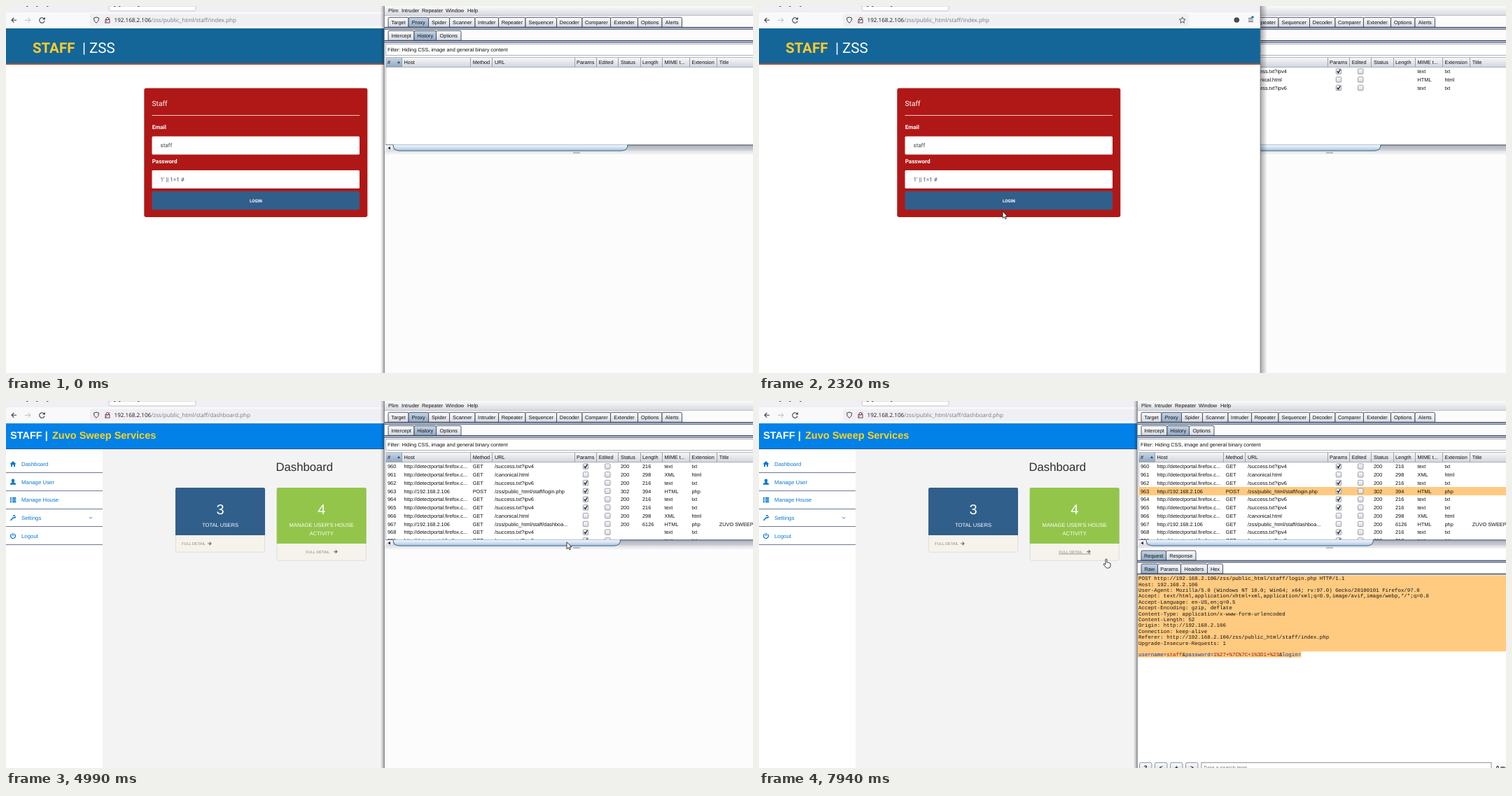
Animation, 1067 px wide and 525 px high, one loop 8 s. Source, as an HTML page:

```html
<!DOCTYPE html>
<html lang="en">
<head>
<meta charset="utf-8">
<title>Login replay</title>
<style>
html, body { margin: 0; width: 100%; height: 100%; overflow: hidden; background: #fff; }
svg { display: block; width: 1067px; height: 525px; }
text { font-family: "Liberation Sans", Arial, sans-serif; text-rendering: geometricPrecision; white-space: pre; }
.r { font-family: Roboto, sans-serif; }
.u { font-family: "Open Sans", sans-serif; }
.m { font-family: "Liberation Mono", monospace; }
.b { font-weight: 700; }
.c { text-anchor: middle; }
</style>
</head>
<body>
<svg id="stage" viewBox="0 0 1067 525"></svg>
<script>
const LOOP = 8000, END = 9999;

// Moments at which the picture switches
const at = {
  browserFront: 940, dropdown: 1010, selected: 1080, badge: 1280, blur: 1700,
  hover: 2390, submit: 2590, dashboard: 3670, loaded: 4500, proxyFront: 4570,
  pickRow: 5600, drag: 6980, dragEnd: 7740, link: 7870
};

// time, x, y, shape
const track = [
  [260, 950, 515, 'arrow'], [330, 640, 360, 'arrow'], [400, 313, 201, 'beam'],
  [600, 313, 201, 'beam'], [740, 299, 245, 'beam'], [940, 299, 245, 'beam'],
  [1150, 64, 238, 'arrow'], [1280, 120, 222, 'arrow'], [1420, 121, 223, 'arrow'],
  [1560, 362, 270, 'arrow'], [1750, 362, 276, 'arrow'], [2190, 354, 323, 'arrow'],
  [2250, 352, 323, 'arrow'], [2320, 348, 294, 'arrow'], [2390, 346, 277, 'hand'],
  [2590, 346, 277, 'arrow'], [2930, 605, 325, 'arrow'], [3950, 605, 325, 'arrow'],
  [4290, 770, 321, 'arrow'], [4500, 770, 321, 'arrow'], [4990, 801, 202, 'arrow'],
  [5260, 790, 150, 'arrow'], [5600, 778, 125, 'arrow'], [6170, 778, 125, 'arrow'],
  [6370, 912, 270, 'beam'], [6580, 808, 366, 'beam'], [6980, 808, 366, 'beam'],
  [7500, 526, 246, 'arrow'], [7800, 526, 246, 'arrow'], [7870, 492, 226, 'hand']
];

const rect = (x, y, w, h, fill, more = '') =>
  `<rect x="${x}" y="${y}" width="${w}" height="${h}" fill="${fill}" ${more}/>`;
const text = (x, y, s, size, fill, cls = '') =>
  `<text x="${x}" y="${y}" font-size="${size}" fill="${fill}" class="${cls}">${s}</text>`;
const line = (d, color, w = 1, more = '') =>
  `<path d="${d}" fill="none" stroke="${color}" stroke-width="${w}" ${more}/>`;
const shape = (d, fill, more = '') => `<path d="${d}" fill="${fill}" ${more}/>`;
const span = (from, to, s) => `<g data-from="${from}" data-to="${to}">${s}</g>`;
const grad = (id, a, b, dir = 'x2="0" y2="1"') =>
  `<linearGradient id="${id}" ${dir}><stop stop-color="${a}"/><stop offset="1" stop-color="${b}"/></linearGradient>`;
const shade = (id, a, b) =>
  `<linearGradient id="${id}"><stop stop-color="#000" stop-opacity="${a}"/><stop offset="1" stop-color="#000" stop-opacity="${b}"/></linearGradient>`;

/* ---------- browser ---------- */

function urlBar(file, from, to) {
  return span(from, to, `<text x="154.5" y="23" font-size="8.1" class="u" fill="#15141a">192.168.2.106<tspan fill="#77767f">/zss/public_html/staff/${file}.php</tspan></text>`);
}

function chrome() {
  const ink = '#3c3b44';
  const scraps = [29, 43, 58, 154, 161, 188].map(x => rect(x, 0, 2.5, 1, '#55545c')).join('');
  return rect(0, 0, 716, 9, '#f0f0f4') +
    shape('M147 0V4.5Q147 7 149.5 7H268.5Q271 7 271 4.5V0Z', '#fff', 'stroke="#b9b9c0" stroke-width=".8"') +
    span(at.submit, at.loaded, shape('M146 0H174L170 6.5H149Q147 6.5 146 3Z', '#a9d5fb')) + scraps +
    rect(0, 9, 716, 23, '#f9f9fb') +
    rect(120, 11.5, 494, 17, '#f0f0f4', 'rx="2"') +
    line('M15 20.3H8M11.3 17L8 20.3L11.3 23.6', ink, 1.1) +
    line('M27 20.3H35M31.7 17L35 20.3L31.7 23.6', '#b9b9bf', 1) +
    span(0, at.submit, reload()) + span(at.loaded, END, reload()) +
    span(at.submit, at.loaded, line('M48.2 17.2L54.8 23.8M54.8 17.2L48.2 23.8', '#aaaab0', .9)) +
    line('M129 16L132.6 17.2Q132.8 22 129 24.4Q125.2 22 125.4 17.2Z', ink, 1) +
    rect(142, 19.5, 6, 4.5, 'none', `stroke="${ink}" stroke-width=".9"`) +
    line('M143 19V17.5Q145 14.8 147 17.5V19', ink, .9) + line('M141.3 24.3L148.3 16.5', '#e22850', .9) +
    urlBar('index', 0, at.dashboard) + urlBar('dashboard', at.dashboard, END) +
    line('M604.7 15.8L606 18.6L609 19L606.8 21.1L607.4 24.2L604.7 22.7L602 24.2L602.6 21.1L600.4 19L603.4 18.6Z', ink, .9) +
    '<circle cx="682.3" cy="20" r="3.8" fill="#4a4952"/>' +
    line('M699 17.5H705M699 20H706M699 22.5H706', ink, .9) +
    '<circle cx="705" cy="16" r="1.8" fill="#12808c"/>';
}

function reload() {
  return line('M54.6 18.6A3.7 3.7 0 1 0 55 21.4', '#3c3b44', 1.1) + shape('M55.8 16V19.6H52.2Z', '#3c3b44');
}

const field = y => rect(208.5, y, 296.5, 26, '#fff', 'rx="1.5"');

function loginPage() {
  const pass = "1' || 1=1 #";
  return rect(0, 32, 716, 493, '#fff') +
    rect(0, 32, 716, 50, '#146698') + rect(0, 82, 716, 2, '#a8513f') +
    text(38, 66.8, 'STAFF', 20.5, '#ffcb2d', 'r b') +
    text(109, 66.8, '| ZSS', 20.5, '#fff', 'r') +
    rect(197.3, 117.6, 319, 184.5, '#b01817', 'rx="3"') +
    text(208.5, 143.3, 'Staff', 10.2, '#fff', 'r') +
    rect(208.5, 156, 296.5, 1, '#ecc9c9') +
    text(208.7, 176.4, 'Email', 8.1, '#fff', 'r b') + field(186.4) +
    text(220.5, 202, 'staff', 8, '#444', 'r') +
    text(208.7, 225.2, 'Password', 8.1, '#fff', 'r b') + field(235) +
    text(220.5, 250.6, pass, 8, '#444', 'r') +
    rect(208.5, 265, 296.5, 26.4, '#305f8b', 'rx="2"') +
    span(at.hover, at.submit, rect(208.5, 265, 296.5, 26.4, '#294f75', 'rx="2"')) +
    text(357, 280.6, 'LOGIN', 6.2, '#fff', 'r b c') +
    span(at.browserFront, at.blur, rect(208.6, 235, 296.4, 26, 'none', 'rx="2" stroke="#1f74bd" stroke-width="1.4"')) +
    span(at.selected, at.blur, rect(220, 243, 34.3, 10.2, '#0078d7') + text(220.5, 250.6, pass, 8, '#fff', 'r')) +
    span(at.dropdown, at.blur, rect(208.5, 261.3, 296.5, 11.8, '#dadada', 'stroke="#aaa" stroke-width=".6"') +
      text(212, 270, pass, 7.6, '#222', 'u')) +
    span(at.badge, at.blur, rect(128, 210, 17, 17, '#ef5150', 'rx="2.5"') +
      '<circle cx="136" cy="217.7" r="3.9" fill="none" stroke="#fff"/>' + line('M138.8 220.6L141.3 223', '#fff', 1.1));
}

function dashboardPage() {
  const blue = '#0b79d0';
  const icons = [
    shape('M5.5 .3L10 -4L14.5 .3H13V4H11V1.2H9V4H7V.3Z', blue),
    shape('M10 -4.2Q13 -4 12 -.7L11.3 .8L14 2.2V4H6V2.2L8.7 .8L8 -.7Q7 -4 10 -4.2Z', blue),
    line('M6 -2.8H8M9 -2.8H14.3M6 0H8M9 0H14.3M6 2.8H8M9 2.8H14.3', blue, 1.9),
    line('M6.5 3.5L11 -1M10.2 -2.6Q11 -4 13 -3.2M13.6 -2Q13 .3 11 -.4', blue, 1.7),
    line('M8 -2.6A3.4 3.4 0 1 0 12 -2.6M10 -4.2V0', blue, 1.3)
  ];
  const menu = ['Dashboard', 'Manage User', 'Manage House', 'Settings', 'Logout'].map((name, i) => {
    const y = 90 + 25.75 * i;
    return `<g transform="translate(0 ${y})">${icons[i]}</g>` + text(22, y + 2.8, name, 7.85, blue) +
      rect(0, Math.round(y + 12.2), 138, 1, '#6c7899');
  }).join('');
  const arrow = (x, y) => line(`M${x} ${y}H${x + 5}M${x + 2.6} ${y - 2.3}L${x + 5} ${y}L${x + 2.6} ${y + 2.3}`, '#77736a', 1.2);
  const card = (x, h, fill, num, words, more) => rect(x + .4, 126, 127.2, h + 22.2, '#f6f3ed', 'rx="2" stroke="#dcd8d0" stroke-width=".8"') +
    shape(`M${x} ${124 + h}V126Q${x} 124 ${x + 2} 124H${x + 126}Q${x + 128} 124 ${x + 128} 126V${124 + h}Z`, fill) +
    text(x + 64, 161.6, num, 20, '#fff', 'c') +
    words.map((w, i) => text(x + 64, 180 + 11.6 * i, w, 7.65, '#fff', 'c')).join('') + more;
  return rect(0, 32, 716, 493, '#f3f3f3') + rect(0, 69, 138, 456, '#fff') +
    rect(0, 32, 716, 36.5, '#0281e8') + rect(0, 68, 716, 1, '#27608f') +
    text(6, 53.8, 'STAFF |', 14.5, '#fff', 'b') + text(66, 53.8, 'Zuvo Sweep Services', 14.5, '#f9d423', 'b') +
    rect(615, 32, 101, 34, '#36a5c5') +
    '<circle cx="665.3" cy="49" r="2.3" fill="none" stroke="#fff" stroke-width="2"/>' +
    '<circle cx="665.3" cy="49" r="3.5" fill="none" stroke="#fff" stroke-width="1.2" stroke-dasharray="1.4 1.35"/>' +
    line('M699.6 58L702 60.3L704.4 58', '#fff', .9) +
    menu + line('M118.8 166L121 168.2L123.2 166', blue, .9) +
    text(385.5, 100, 'Dashboard', 16.7, '#2e2e2e') +
    card(242, 68, '#305f8b', 3, ['TOTAL USERS'], text(251, 206, 'FULL DETAIL', 5.6, '#8c877c') + arrow(288, 204)) +
    card(386.7, 80, '#93c54b', 4, ["MANAGE USER'S HOUSE", 'ACTIVITY'], text(428.2, 217.8, 'FULL DETAIL', 5.6, '#8c877c') +
      arrow(468, 215.6) + span(at.link, END, rect(428, 218.6, 46, .7, '#77736a')));
}

/* ---------- proxy tool ---------- */

const SMALL = 7.35, INK = '#111';

function tabs(y, list, active) {
  return list.map(([name, x, end]) =>
    shape(`M${x} ${y + 14}V${y + 2}Q${x} ${y} ${x + 2} ${y}H${end - 2}Q${end} ${y} ${end} ${y + 2}V${y + 14}Z`,
      `url(#${name === active ? 'tabOn' : 'tab'})`, 'stroke="#3a4358" stroke-width=".9"') +
    text((x + end) / 2, y + 9.5, name, SMALL, INK, 'c')).join('') +
    rect(540, y + 13.7, 527, 1.2, '#2e3a57') + rect(540, y + 14.9, 527, 1.4, '#b3c1d3') + rect(540, y + 16.3, 527, 1, '#2e3a57');
}

function check(x, y, on) {
  return rect(x - 3.7, y - 3.7, 7.4, 7.4, 'url(#tab)', 'rx="1" stroke="#858a94" stroke-width=".8"') +
    (on ? line(`M${x - 2.2} ${y - .3}L${x - .5} ${y + 2}L${x + 2.4} ${y - 2.8}`, '#1a2030', 1.3) : '');
}

const columns = [['#', 541, 545], ['Host', 565, 568.5], ['Method', 663, 666.7], ['URL', 694, 698], ['Params', 812, 815],
  ['Edited', 843, 846.7], ['Status', 874, 878], ['Length', 906, 909], ['MIME t...', 937, 940.5], ['Extension', 976, 979.5], ['Title', 1015, 1018.7]];

const kinds = {
  v4: ['GET', '/success.txt?ipv4', 1, 200, 216, 'text', 'txt'],
  v6: ['GET', '/success.txt?ipv6', 1, 200, 216, 'text', 'txt'],
  canon: ['GET', '/canonical.html', 0, 200, 298, 'XML', 'html'],
  login: ['POST', '/zss/public_html/staff/login.php', 1, 302, 394, 'HTML', 'php'],
  dash: ['GET', '/zss/public_html/staff/dashboa...', 0, 200, 6126, 'HTML', 'php', 'ZUVO SWEEP SERVICES']
};

// kind, time of request, time of answer
const log = [['v4', 1950, 2800], ['canon', 1950, 2800], ['v6', 1950, 3070], ['login', 2660, 2800], ['v6', 3070, 4000],
  ['v4', 3140, 4000], ['canon', 3670, 4070], ['dash', 3670, 3670], ['v4', 4140, 5200], ['v6', 4210, 5200]];

function row([kind, sent, done], i) {
  const [method, url, params, status, size, mime, ext, title = ''] = kinds[kind];
  const y = 93.5 + 11.77 * i;
  const host = kind === 'login' || kind === 'dash' ? 'http://192.168.2.106' : 'http://detectportal.firefox.c...';
  const cell = (col, s) => text(columns[col][2], y + 2.7, s, SMALL, INK);
  return span(sent, END, cell(0, 960 + i) + cell(1, host) + cell(2, method) + cell(3, url) +
    check(828, y, params) + check(859.3, y, 0) + cell(9, ext) + cell(10, title) +
    span(sent, done, cell(8, mime === 'XML' ? 'HTML' : mime)) +
    span(done, END, cell(6, status) + cell(7, size) + cell(8, mime)));
}

function thumb(end) {
  return shape(`M553 198.6Q553 207 562 207H${end - 9}Q${end} 207 ${end} 198.6`, 'url(#thumb)', 'stroke="#3d5f85"');
}

const request = ['POST http://192.168.2.106/zss/public_html/staff/login.php HTTP/1.1', 'Host: 192.168.2.106',
  'User-Agent: Mozilla/5.0 (Windows NT 10.0; Win64; x64; rv:97.0) Gecko/20100101 Firefox/97.0',
  'Accept: text/html,application/xhtml+xml,application/xml;q=0.9,image/avif,image/webp,*/*;q=0.8',
  'Accept-Language: en-US,en;q=0.5', 'Accept-Encoding: gzip, deflate', 'Content-Type: application/x-www-form-urlencoded',
  'Content-Length: 52', 'Origin: http://192.168.2.106', 'Connection: keep-alive',
  'Referer: http://192.168.2.106/zss/public_html/staff/index.php', 'Upgrade-Insecure-Requests: 1', '',
  [['username', 'staff'], ['password', '1%27+%7C%7C+1%3D1+%23'], ['login', '']].map(([k, v]) =>
    `<tspan fill="#1a2f9c">${k}=</tspan><tspan fill="#9a1515">${v}</tspan>`).join('&amp;')];
const PITCH = 8.385, lineTop = i => 249.3 + PITCH * i;

function requestPanel() {
  const buttons = ['?', '&lt;', '+', '&gt;'].map((s, i) =>
    rect(543.5 + 22 * i, 517.3, 17.5, 14, 'url(#tab)', 'rx="2.5" stroke="#8b93a0"') + text(552.3 + 22 * i, 527, s, 8, INK, 'c b')).join('');
  return rect(540, 211, 527, 314, '#fff') +
    tabs(214, [['Request', 546, 581.5], ['Response', 581.5, 624]], 'Request') +
    tabs(233, [['Raw', 546, 569.5], ['Params', 569.5, 602.5], ['Headers', 602.5, 640.5], ['Hex', 640.5, 662.5]], 'Raw') +
    rect(541, 249, 526, 267, '#fff') +
    '<path id="mark" fill="#ffcb80"/>' +
    request.map((s, i) => text(542, lineTop(i) + 7, s, 7.45, INK, 'm')).join('') +
    rect(540, 516, 527, 9, '#fafafa') + buttons +
    rect(632, 517.3, 414, 14, '#fff', 'stroke="#8b93a0"') +
    `<g font-style="italic">${text(634.5, 527, 'Type a search term', SMALL, '#777')}</g>` + text(1053, 527, '0 matches', SMALL, INK, 'b');
}

function proxy() {
  const menu = [['Plim', 546], ['Intruder', 565], ['Repeater', 594], ['Window', 628], ['Help', 659]];
  const main = [['Target', 546, 575], ['Proxy', 575, 603.5], ['Spider', 603.5, 633.5], ['Scanner', 633.5, 670], ['Intruder', 670, 703.5],
    ['Repeater', 703.5, 742], ['Sequencer', 742, 786.5], ['Decoder', 786.5, 823], ['Comparer', 823, 863.5], ['Extender', 863.5, 902.5],
    ['Options', 902.5, 937], ['Alerts', 937, 965.5]];
  return rect(540, 0, 527, 525, '#fcfcfc') + rect(540, 0, 527, 13, 'url(#bar)') + rect(540, 13, 527, 1, '#bfc2c8') +
    menu.map(([s, x]) => text(x, 8.6, s, SMALL, INK)).join('') +
    tabs(16.3, main, 'Proxy') + tabs(35.3, [['Intercept', 546, 583], ['History', 583, 614.5], ['Options', 614.5, 650]], 'History') +
    rect(542.5, 54.5, 540, 16, '#fff', 'stroke="#9a9da5" stroke-width=".8"') +
    text(545, 65, 'Filter: Hiding CSS, image and general binary content', SMALL, INK) +
    rect(542.5, 73.5, 540, 125, '#fff', 'stroke="#a4a8b0" stroke-width=".8"') +
    rect(542, 74, 525, 13, 'url(#head)') + rect(542, 74, 23, 13, 'url(#tabOn)') + rect(542, 87, 525, 1, '#a9aeb7') +
    columns.map(([s, x, tx]) => (x > 541 ? rect(x, 74, 1, 13, '#9ba1ac') : '') + text(tx, 82.8, s, SMALL, INK)).join('') +
    shape('M558.7 82L561 78.5L563.3 82Z', '#3c5878') +
    `<g clip-path="url(#rows)">` + span(at.pickRow, END, rect(542, 123, 525, 11.9, '#ffca80')) +
    span(at.pickRow, at.drag, rect(695.5, 123.5, 116.5, 11, 'none', 'stroke="#7c8aa0" stroke-width=".8"')) +
    log.map(row).join('') + '</g>' +
    rect(542, 198.7, 525, 8.8, 'url(#track)') + rect(542, 198.5, 525, .9, '#4d566b') +
    rect(542, 199, 11, 8.5, 'url(#bar)') + shape('M549 201L545.3 203.2L549 205.4Z', '#222c40') +
    span(0, 4000, thumb(888)) + span(4000, END, thumb(877.5)) +
    rect(540, 208.6, 527, .7, '#b9bcc4') + rect(540, 210.8, 527, .6, '#d3d5da') + rect(810, 209.3, 10, 1.4, '#a0a4ad') +
    span(at.pickRow + 70, END, requestPanel());
}

const pointers = {
  arrow: shape('M0 0V9.8L2.3 7.7L3.8 11L5.4 10.3L3.9 7.1H7Z', '#fff', 'stroke="#111" stroke-width=".8"'),
  beam: line('M-2.2 -4.6H2.2M0 -4.6V4.6M-2.2 4.6H2.2', '#111', .9),
  hand: shape('M3 1Q3 0 4 0Q5 0 5 1V5Q6.4 4.4 6.8 5.4Q8 4.8 8.5 5.8Q10 5.4 10 7V9.5Q10 13 6.8 13H5.6Q3.8 13 2.6 11L.2 7.8Q0 6.5 1.3 6.7L3 8Z', '#fff', 'stroke="#111" stroke-width=".8"')
};

const stage = document.getElementById('stage');
stage.innerHTML = `<defs>
  ${grad('tab', '#fbfbfc', '#d6dae1')}${grad('tabOn', '#c6d4e3', '#92aac4')}${grad('bar', '#fafafb', '#d9dbe0')}
  ${grad('head', '#f6f7f9', '#d3d6dc')}${grad('track', '#a9afb8', '#d2d5da')}${grad('thumb', '#f4f9fd', '#a9c8e6')}
  ${shade('shadeL', 0, .3)}${shade('shadeR', .34, 0)}
  <clipPath id="pane"><rect id="paneBox" y="0" width="527" height="525"/></clipPath>
  <clipPath id="rows"><rect x="541" y="87" width="526" height="112"/></clipPath></defs>` +
  chrome() + span(0, at.dashboard, loginPage()) + span(at.dashboard, END, dashboardPage()) +
  `<g clip-path="url(#pane)">${proxy()}</g>` +
  [[0, at.browserFront], [at.proxyFront, END]].map(([a, b]) =>
    span(a, b, rect(535, 0, 5, 525, 'url(#shadeL)') + rect(539.8, 0, .9, 525, '#686c75'))).join('') +
  span(at.browserFront, at.proxyFront, rect(716, 0, 10, 525, 'url(#shadeR)') + rect(715.7, 0, .8, 525, '#777b84')) +
  Object.entries(pointers).map(([k, s]) => `<g id="${k}">${s}</g>`).join('');

const $ = id => document.getElementById(id);
const spans = [...stage.querySelectorAll('[data-from]')].map(el => [el, +el.dataset.from, +el.dataset.to]);

function pointer(t) {
  let i = track.length - 1;
  while (i > 0 && track[i][0] > t) i--;
  const [t0, x0, y0, kind] = track[i], next = track[i + 1];
  if (!next) return [x0, y0, kind];
  const k = Math.max(0, (t - t0) / (next[0] - t0));
  return [x0 + (next[1] - x0) * k, y0 + (next[2] - y0) * k, kind];
}

// Marked text runs from the pointer down to the end of the request
function markPath(t) {
  if (t < at.drag) return '';
  const [px, py] = pointer(Math.min(t, at.dragEnd)), last = 13, end = 774.5;
  const n = Math.max(0, Math.min(last, Math.round((py - 253.5) / PITCH)));
  const x = Math.max(541, n === last ? Math.min(px, end) : px);
  return n === last ? `M${x} ${lineTop(n)}H${end}V${lineTop(n + 1)}H${x}Z`
    : `M${x} ${lineTop(n)}H1067V${lineTop(last)}H${end}V${lineTop(last + 1)}H541V${lineTop(n + 1)}H${x}Z`;
}

function render(t) {
  for (const [el, from, to] of spans) el.style.display = t >= from && t < to ? '' : 'none';
  $('paneBox').setAttribute('x', t >= at.browserFront && t < at.proxyFront ? 716 : 540);
  $('mark').setAttribute('d', markPath(t));
  const [x, y, kind] = pointer(t);
  for (const k in pointers) {
    $(k).style.display = k === kind && t >= track[0][0] ? '' : 'none';
    $(k).setAttribute('transform', `translate(${x.toFixed(1)} ${y.toFixed(1)})`);
  }
}

const start = performance.now();
function tick() {
  render((performance.now() - start) % LOOP);
  requestAnimationFrame(tick);
}
tick();
</script>
</body>
</html>
```
